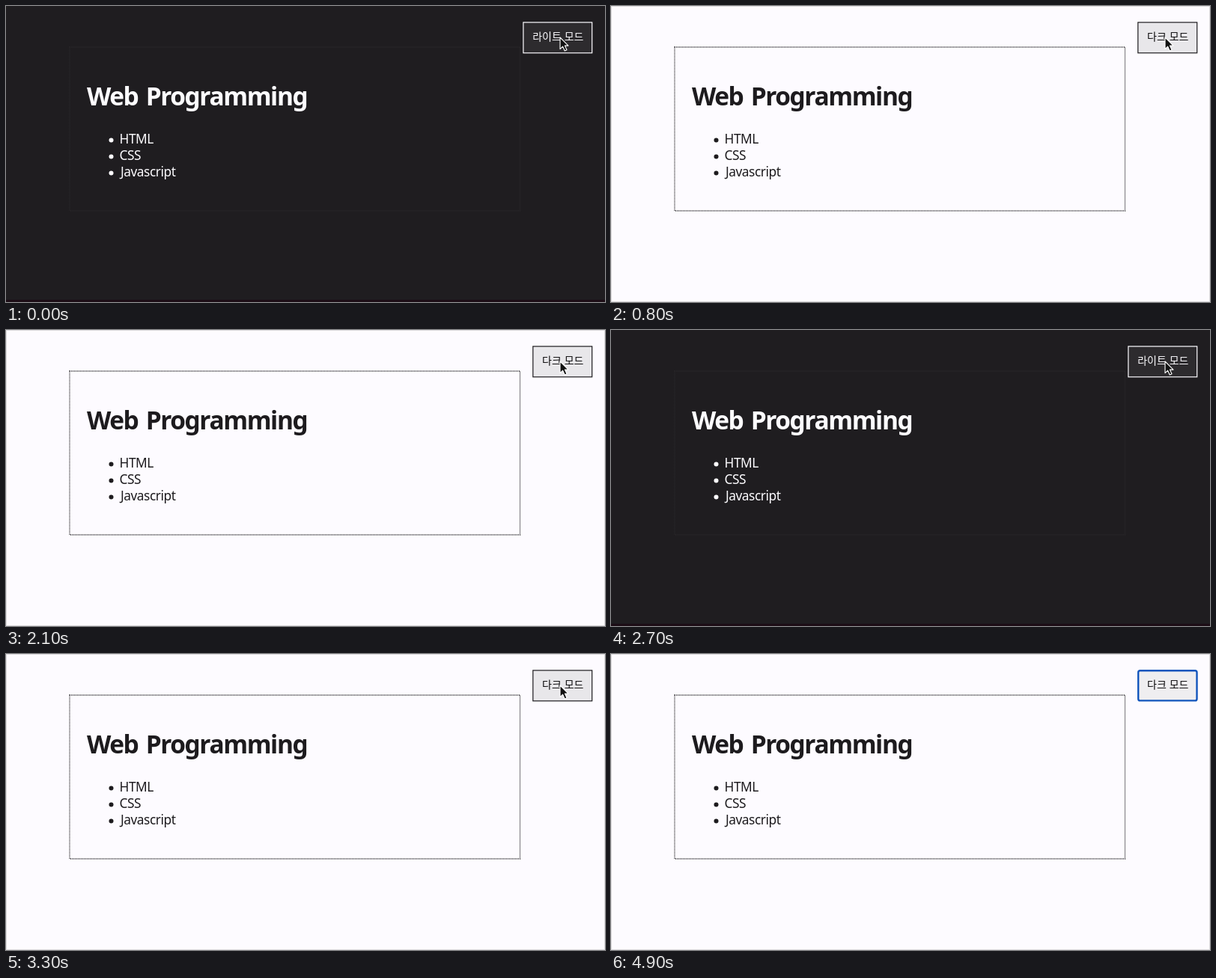
An HTML page for the animation above (5000 ms loop, 800 px wide and 396 px high).

```html
<!DOCTYPE html>
<html lang="ko">
<head>
<meta charset="utf-8">
<title>Web Programming</title>
<style>
html, body { margin: 0; width: 100%; height: 100%; overflow: hidden; }
svg { display: block; width: 100vw; height: 100vh; font: 500 17.3px "Noto Sans", sans-serif; letter-spacing: -.45px; }
.title { font-size: 33.5px; font-weight: 600; letter-spacing: -1.45px; word-spacing: 3px; }
#label { font: 500 14px "Noto Sans CJK KR", "Noto Sans CJK", sans-serif; letter-spacing: 0; }
</style>
</head>
<body>
<svg viewBox="0 0 800 396">
  <rect id="page" width="800" height="396"/>
  <rect id="edge" x=".5" y=".5" width="799" height="395" fill="none" stroke="#dddbde"/>
  <rect id="strip" y="393" width="800" height="3" fill="#1c0d16"/>
  <rect id="card" x="85" y="55" width="601.5" height="219" fill="none" stroke-width="1.3" stroke-dasharray="1 1"/>
  <g id="copy">
    <text class="title" x="108" y="133">Web Programming</text>
    <circle cx="140.5" cy="179.5" r="3"/><text x="151.6" y="184.4">HTML</text>
    <circle cx="140.5" cy="201.5" r="3"/><text x="151.6" y="206.4">CSS</text>
    <circle cx="140.5" cy="223.5" r="3"/><text x="153" y="228.4">Javascript</text>
  </g>
  <rect id="button" y="21.9" height="40.9" stroke-width="1.2"/>
  <rect id="ring" x="704.2" y="22.2" width="78.3" height="40.2" rx="2.5" fill="none" stroke="#1356bd" stroke-width="2.4"/>
  <text id="label" x="771.5" y="46" text-anchor="end"></text>
  <path id="cursor" d="M0 0V15.6L3.6 12.2L6.2 18L9 16.8L6.4 11.1H11Z" fill="#111" stroke="#fff" stroke-width="1.1" stroke-linejoin="round"/>
</svg>
<script>
const LOOP = 5000, LEAVE = 3800, GONE = 4300, STEP = 100;
const $ = id => document.getElementById(id);
const set = (id, attrs) => {
  for (const k in attrs) $(id).setAttribute(k, attrs[k]);
};
const show = (id, on) => set(id, { visibility: on ? "visible" : "hidden" });

const themes = {
  dark: { page: "#1f1d20", ink: "#fdfcff", card: "#2a282b", button: "#2d2b2e", hover: "#2d2b2e", x: 690.9, label: "라이트 모드" },
  light: { page: "#fdfbff", ink: "#1d1b1e", card: "#252326", button: "#efeef0", hover: "#e8e7ea", x: 703.8, label: "다크 모드" }
};

const isDark = t => t < 700 || (t >= 1400 && t < 2100) || (t >= 2700 && t < 3300);

// The pointer holds on the button, then speeds off to the left in 100 ms steps.
function pointer(t) {
  const n = t < LEAVE ? 0 : Math.floor((t - LEAVE) / STEP) + 1;
  const p = Math.min(n / 5, 1) ** 2;
  return { x: 740 - 358 * p, y: 42 + 70 * p };
}

function draw(t) {
  const dark = isDark(t), c = dark ? themes.dark : themes.light;
  const { x, y } = pointer(t);
  const over = x >= c.x && t < GONE;
  set("page", { fill: c.page });
  set("card", { stroke: c.card });
  set("copy", { fill: c.ink });
  set("button", { x: c.x, width: 782.7 - c.x, fill: over ? c.hover : c.button, stroke: t >= GONE ? "none" : c.ink });
  set("label", { fill: dark ? c.ink : "#0b0a0c" });
  $("label").textContent = c.label;
  set("cursor", { transform: `translate(${x} ${y})` });
  show("cursor", t < GONE);
  show("ring", t >= GONE);
  show("edge", !dark);
  show("strip", dark);
}

const start = performance.now();
function tick() {
  draw((performance.now() - start) % LOOP);
  requestAnimationFrame(tick);
}
draw(0);
requestAnimationFrame(tick);
</script>
</body>
</html>
```
